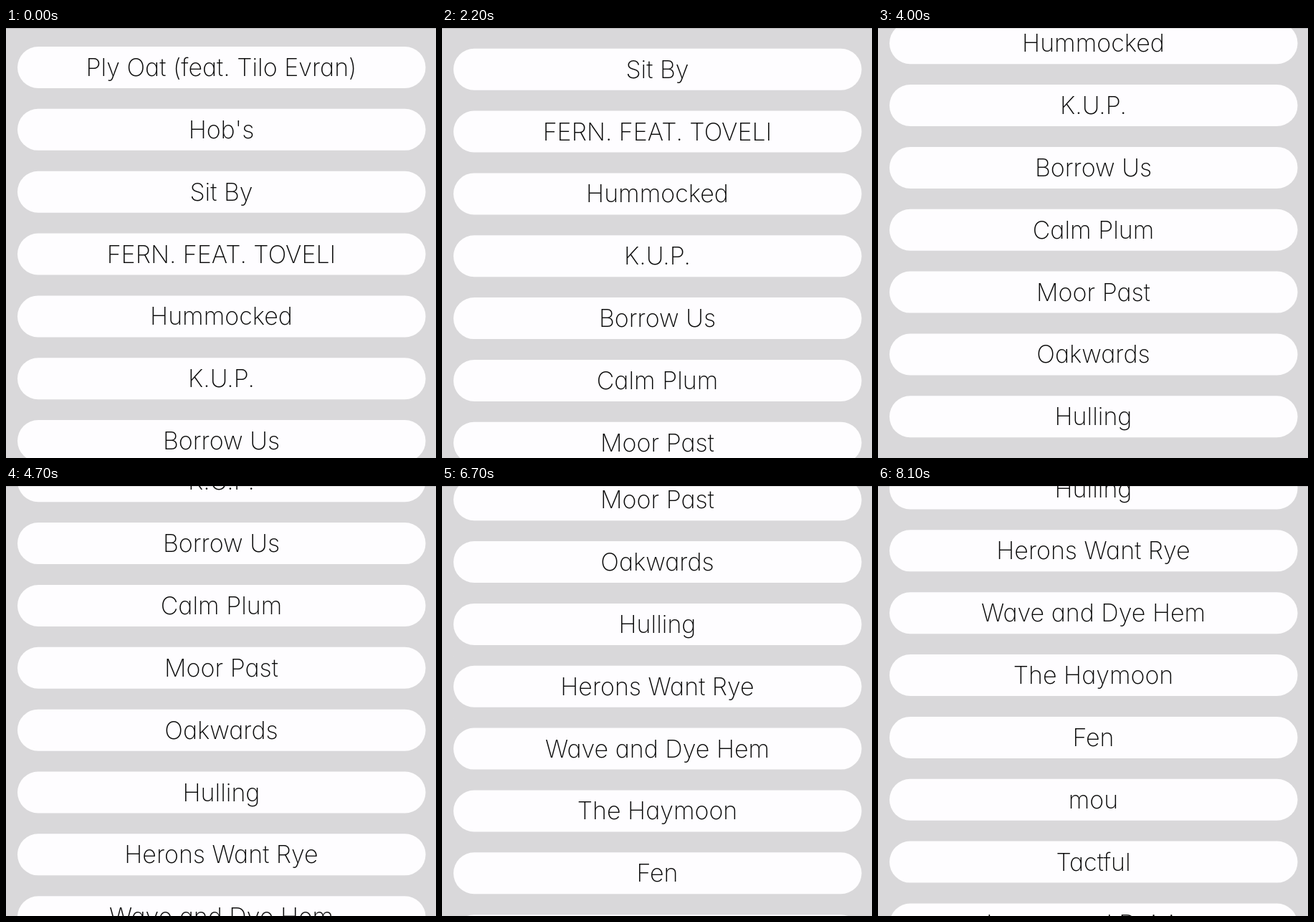
Animation, 600 px wide and 600 px high, one loop 8200 ms. Source, as an HTML page:

```html
<!DOCTYPE html>
<html lang="en">
<head>
<meta charset="utf-8">
<title>Scrolling song list</title>
<style>
  html, body { margin: 0; height: 100%; overflow: hidden; background: #d9d8da; }
  svg { display: block; width: 100vw; height: 100vh; }
  .pill { fill: #fefdff; }
  text {
    font: 200 34px Inter, Lato, sans-serif;
    font-feature-settings: "cv11"; /* single-storey a */
    text-anchor: middle;
    fill: #0a0a0a;
  }
</style>
</head>
<body>
<svg viewBox="0 0 600 600">
  <rect width="600" height="600" fill="#d9d8da"/>
  <g id="list"></g>
  <rect width="600" height="1" fill="#000" opacity=".14"/>
</svg>
<script>
const LOOP = 8200, STEP = 100, TOP = 26, PITCH = 86.85;
const titles = [
  "Ply Oat (feat. Tilo Evran)", "Hob's", "Sit By", "FERN. FEAT. TOVELI",
  "Hummocked", "K.U.P.", "Borrow Us", "Calm Plum", "Moor Past", "Oakwards",
  "Hulling", "Herons Want Rye", "Wave and Dye Hem", "The Haymoon", "Fen",
  "mou", "Tactful", "Loams and Daisies"
];

// [time in ms, scroll distance in px]
const keys = [
  [600, 0], [1400, 78], [2200, 171], [3300, 276.5], [4700, 496],
  [5200, 566], [5700, 566], [6700, 730.6], [8100, 920]
];

const list = document.getElementById("list");

function add(tag, attributes, content = "") {
  const node = document.createElementNS(list.namespaceURI, tag);
  for (const [name, value] of Object.entries(attributes)) node.setAttribute(name, value);
  node.textContent = content;
  list.append(node);
}

titles.forEach((title, i) => {
  const y = TOP + i * PITCH;
  add("rect", { class: "pill", x: 16, y, width: 569.5, height: 58, rx: 29 });
  add("text", { x: 300.5, y: y + 41 }, title);
});

// Monotone cubic interpolation: the list never scrolls back.
const secants = keys.slice(1).map(([t, y], i) => (y - keys[i][1]) / (t - keys[i][0]));
const slopes = keys.map((_, i) => {
  if (i === 0) return 0;
  if (i === keys.length - 1) return secants[i - 1];
  const a = secants[i - 1], b = secants[i];
  return a * b > 0 ? 2 * a * b / (a + b) : 0;
});

function scrollAt(time) {
  if (time <= keys[0][0]) return 0;
  const i = keys.findIndex(([t]) => time <= t) - 1;
  const [t0, y0] = keys[i], [t1, y1] = keys[i + 1];
  const span = t1 - t0, u = (time - t0) / span, v = 1 - u;
  return y0 * v * v * (1 + 2 * u) + y1 * u * u * (3 - 2 * u)
    + span * u * v * (slopes[i] * v - slopes[i + 1] * u);
}

function draw() {
  const time = Math.floor(performance.now() % LOOP / STEP) * STEP;
  list.setAttribute("transform", `translate(0 ${-scrollAt(time)})`);
  requestAnimationFrame(draw);
}
draw();
</script>
</body>
</html>
```
